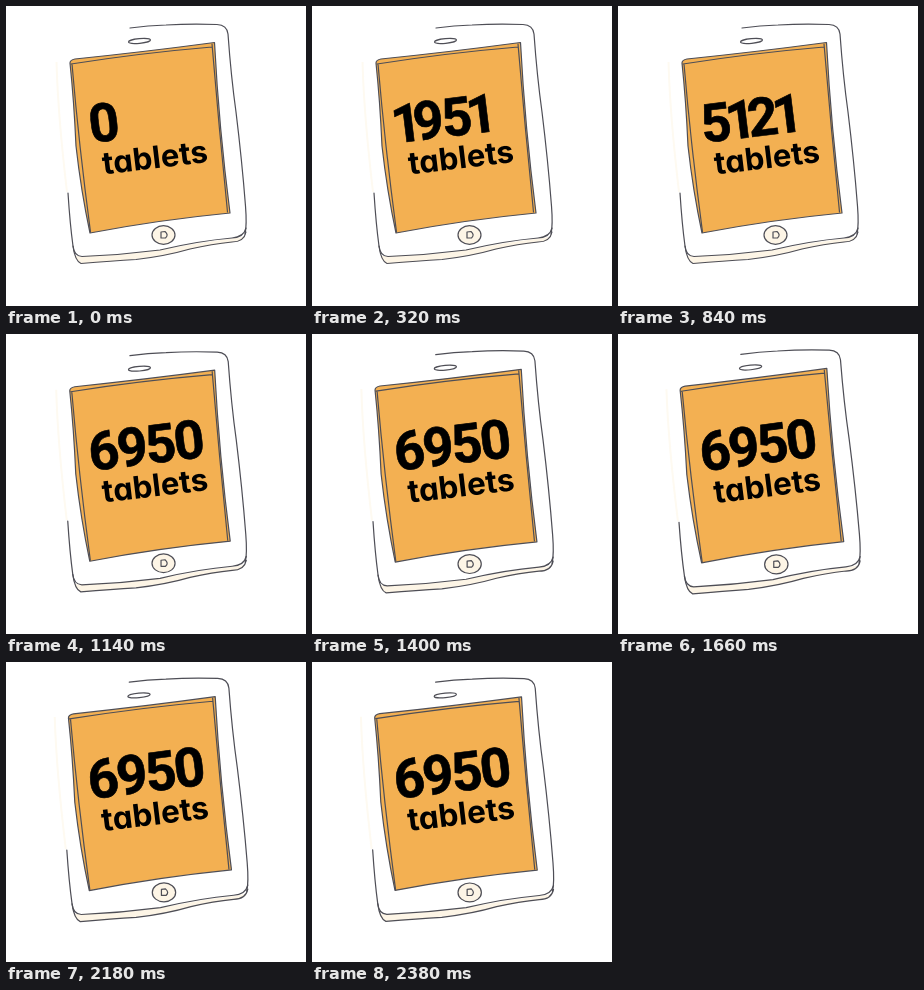
Recreate the animation shown at these times as an HTML page. Size 300 by 300 pixels, loop 2400 ms.

```html
<!DOCTYPE html>
<html lang="en">
<head>
<meta charset="utf-8">
<title>Tablet counter</title>
<style>
  html, body { margin: 0; width: 100%; height: 100%; overflow: hidden; background: #fff; }
  svg { display: block; width: 100vw; height: 100vh; }
  .ink { fill: none; stroke: #4e4e56; stroke-width: 1.2; stroke-linecap: round; stroke-linejoin: round; }
  .cream { fill: #fdf5e6; }
  #count { font: 700 53.5px Roboto, "Liberation Sans", sans-serif; stroke: #000; stroke-width: .6; }
  #label { font: 700 31px Inter, "Open Sans", sans-serif; font-feature-settings: "cv11"; letter-spacing: .1px; }
</style>
</head>
<body>
<svg viewBox="0 0 300 300">
  <g id="tablet">
    <!-- body and its lower edge -->
    <path class="cream" d="M68 249 Q71 251 80 250 Q120 249 154 244 Q195 236 237 231 L240 228 Q238 235 228 236 Q190 241 160 249 Q110 256 75 257.500 Q70 255 68 249Z"/>
    <path d="M50.500 56 Q52 110 61 186" fill="none" stroke="#fefaf1" stroke-width="2"/>
    <path class="ink" d="M124 22 Q142 19.500 160 19 Q185 17.500 211 18.500 Q221 19 222 28 Q225 70 230 106 Q236 155 239.500 200 Q241 219 239 228"/>
    <path class="ink" d="M62 187 Q64 218 67 240 Q68 250 76 250.500 Q115 249 154 244 Q192 235 226 232 Q238 231 240 222"/>
    <path class="ink" d="M67 240 Q69 255 75 257.500 Q106 255 130 253.500 Q160 250 184 243 Q206 238 226 236 Q238 236 240 226"/>
    <!-- screen -->
    <path class="ink" d="M64 57 Q64 54 69 53 Q137 46 208.500 36.500 Q213 122 224 207 Q152 214 84 227 Q75 185 70 140 Q68 95 64 57Z" style="fill:#f3b052"/>
    <path class="ink" d="M65 58 Q135 47 206 41 M66 58 Q73 140 84.500 226 M206 38 Q213 122 221.500 206"/>
    <ellipse class="ink" cx="133.500" cy="35" rx="11" ry="2.300" transform="rotate(-5 133.500 35)"/>
    <ellipse class="ink" cx="157.500" cy="229" rx="11.500" ry="9.300" style="fill:#fdf5e6"/>
    <path class="ink" d="M155 226 L159 225.500 Q163 229 159.500 232 L155 232Z"/>
    <!-- lettering -->
    <text id="count" transform="translate(85 137) rotate(-7)">0</text>
    <text id="label" transform="translate(97.500 168.500) rotate(-6.800)">tablets</text>
  </g>
</svg>
<script>
  const LOOP = 2400, STEP = 20;
  const TOTAL = 6950, COUNT_END = 1140;
  const CX = 145.5, CY = 138;
  const tablet = document.getElementById("tablet");
  const count = document.getElementById("count");

  const progress = (t, from, to) => Math.min(1, Math.max(0, (t - from) / (to - from)));
  const smooth = p => p * p * (3 - 2 * p);

  // Proportional figures: the 1 sits tighter than the other digits.
  function setCount(n) {
    const digits = String(n);
    let pen = 0;
    const xs = [...digits].map(d => {
      const x = d === "1" ? pen - 3.5 : pen;
      pen += d === "1" ? 18.5 : 28.5;
      return x;
    });
    count.setAttribute("x", xs.join(" "));
    count.textContent = digits;
  }

  function draw(t) {
    setCount(Math.round(TOTAL * progress(t, 0, COUNT_END)));
    const scale = 1 + 0.016 * smooth(progress(t, 960, 1620));
    const tilt = -4.3 * Math.sin(Math.PI * progress(t, 1600, 2220)) ** 2;
    tablet.setAttribute("transform",
      `translate(${CX} ${CY}) rotate(${tilt}) scale(${scale}) translate(${-CX} ${-CY})`);
  }

  const start = performance.now();
  function tick() {
    const t = (performance.now() - start) % LOOP;
    draw(Math.floor(t / STEP) * STEP);
    requestAnimationFrame(tick);
  }
  draw(0);
  requestAnimationFrame(tick);
</script>
</body>
</html>
```
